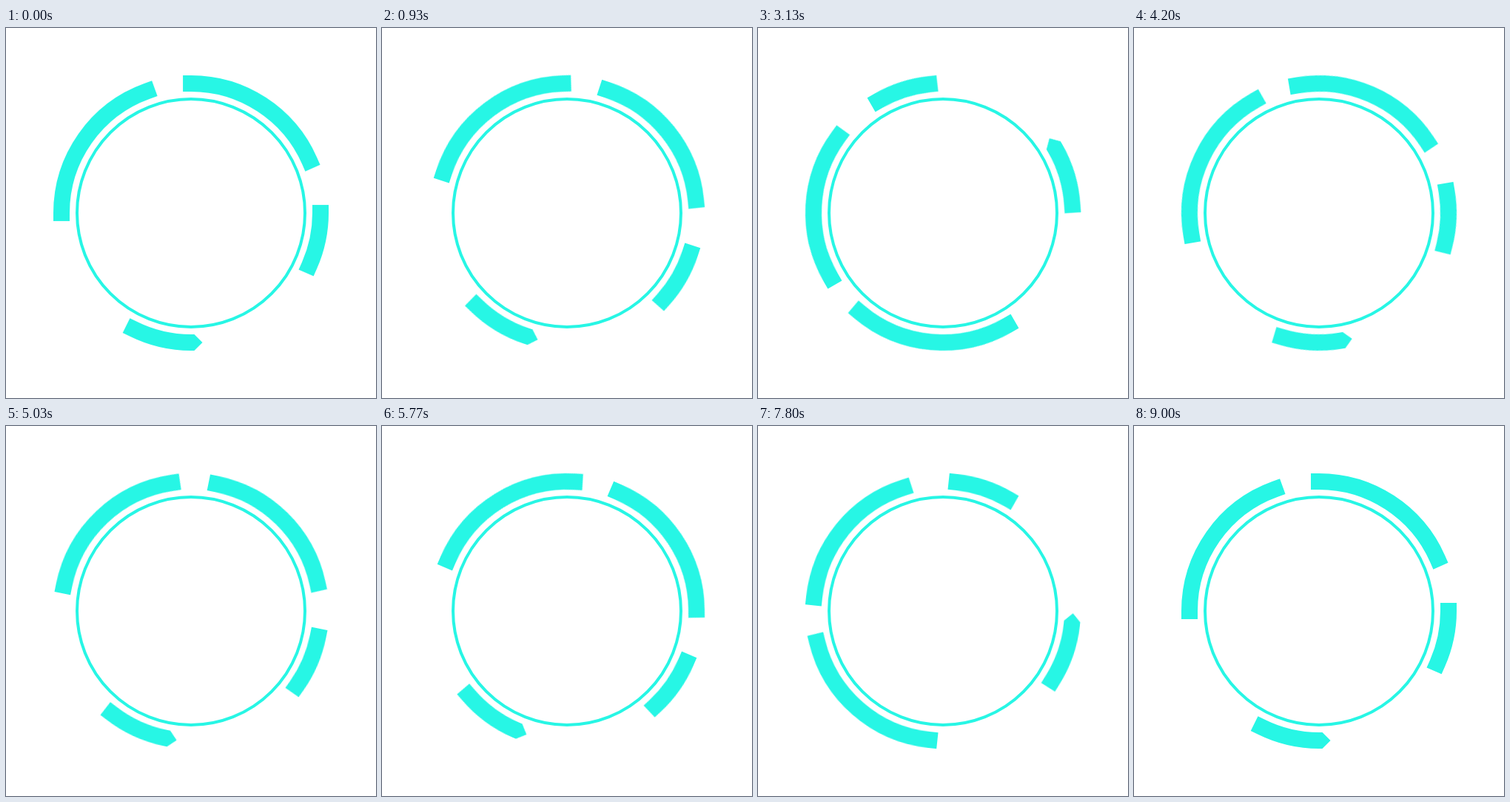
These frames come from a looping animation (500 by 500 pixels, 9030 ms). An HTML page without scripts:

```html
<!DOCTYPE html>
<html lang="en">
<head>
<meta charset="utf-8">
<title>Ring loader</title>
<style>
  html, body {
    margin: 0;
    width: 100%;
    height: 100%;
    overflow: hidden;
    background: #fff;
  }
  svg {
    display: block;
    width: 100vw;
    height: 100vh;
  }
  circle {
    fill: none;
    stroke: #27f6e5;
  }
  .ring { stroke-width: 4; }
  .arcs {
    stroke-width: 22;
    stroke-linecap: square;
    stroke-dasharray: 23.9 66.1 26.3 63.7 70.1 19.9 66.1 23.9;
    transform-origin: 250px 250px;
    animation: spin 9.03s infinite;
  }
  /* two surging turns, then a short rest before the loop restarts */
  @keyframes spin {
    0%      { transform: rotate(0deg);     animation-timing-function: cubic-bezier(.333, .464, .667, .727); }
    14.064% { transform: rotate(23.2deg);  animation-timing-function: cubic-bezier(.333, .313, .667, .498); }
    21.041% { transform: rotate(33.3deg);  animation-timing-function: cubic-bezier(.333, .048, .667, .546); }
    34.662% { transform: rotate(239.8deg); animation-timing-function: cubic-bezier(.333, .351, .667, .691); }
    36.545% { transform: rotate(275.9deg); animation-timing-function: cubic-bezier(.333, .81, .667, .849); }
    46.512% { transform: rotate(350.3deg); animation-timing-function: cubic-bezier(.333, .387, .667, .722); }
    49.834% { transform: rotate(360deg);   animation-timing-function: cubic-bezier(.333, .464, .667, .727); }
    63.898% { transform: rotate(383.2deg); animation-timing-function: cubic-bezier(.333, .313, .667, .498); }
    70.875% { transform: rotate(393.3deg); animation-timing-function: cubic-bezier(.333, .048, .667, .546); }
    84.496% { transform: rotate(599.8deg); animation-timing-function: cubic-bezier(.333, .351, .667, .691); }
    86.379% { transform: rotate(635.9deg); animation-timing-function: cubic-bezier(.333, .81, .667, .849); }
    96.346% { transform: rotate(710.3deg); animation-timing-function: cubic-bezier(.333, .387, .667, .722); }
    99.668%, 100% { transform: rotate(720deg); }
  }
</style>
</head>
<body>
<svg viewBox="0 0 500 500">
  <circle class="ring" cx="250" cy="250" r="154"/>
  <circle class="arcs" cx="250" cy="250" r="175" pathLength="360"/>
</svg>
</body>
</html>
```
